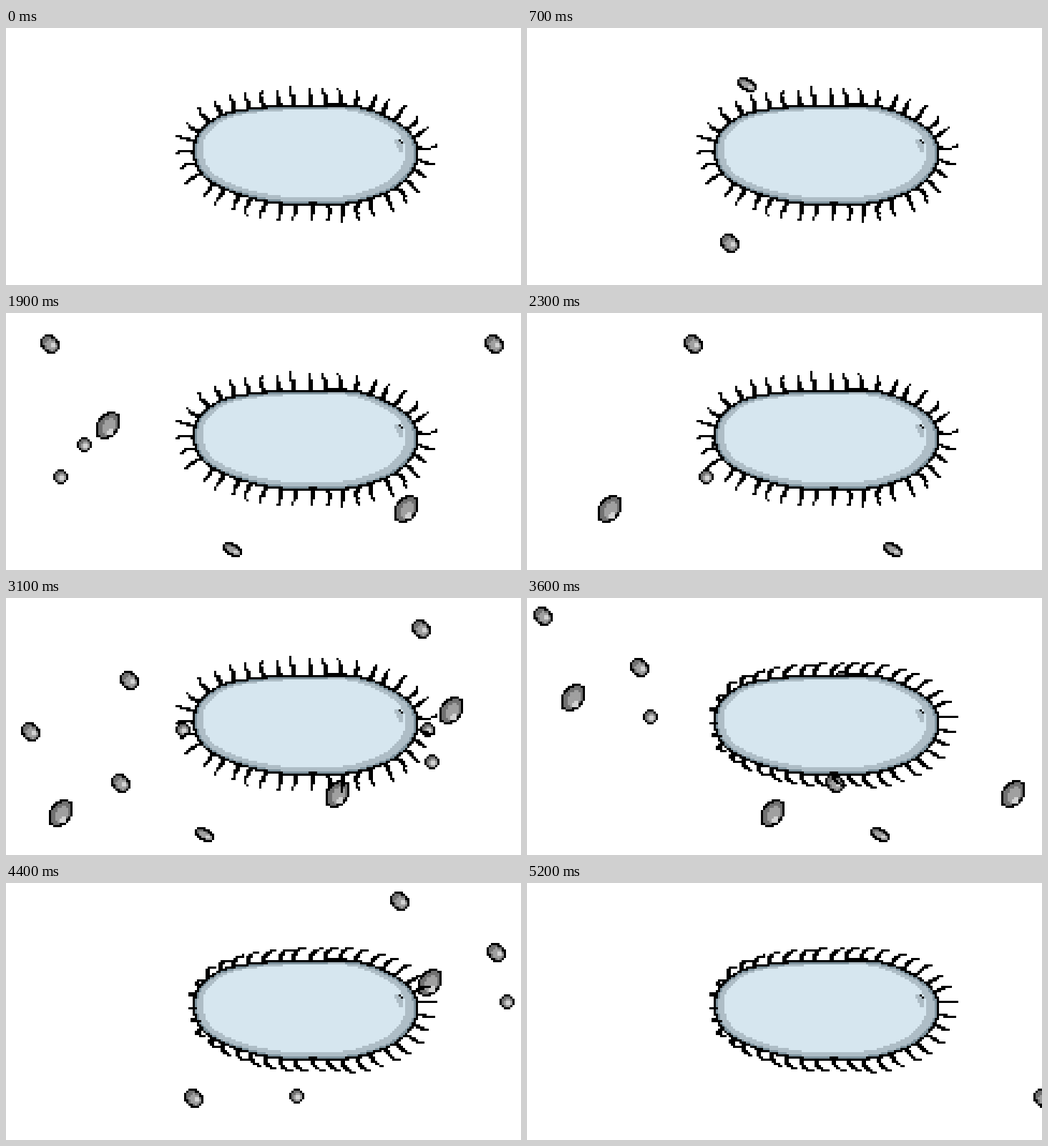
Write an HTML page with a canvas that moves like this. It is 720 by 360 pixels and loops after 5220 ms.

```html
<!DOCTYPE html>
<html>
<head>
<meta charset="utf-8">
<style>
  html, body { margin: 0; width: 100%; height: 100%; overflow: hidden; background: #fff; }
  canvas { display: block; width: 720px; height: 360px; image-rendering: pixelated; }
</style>
</head>
<body>
<canvas id="stage" width="240" height="120"></canvas>
<script>
const ctx = document.getElementById('stage').getContext('2d');
const CELL = 3, STEP = 100, LOOP = 5220, HAIRS = 39;

let seed = 11;
const random = () => (seed = seed * 16807 % 2147483647) / 2147483647;
const wobble = size => (random() * 2 - 1) * size;

// Hard-edged polygon fill on the coarse pixel grid.
function fill(points, color, ox = 0, oy = 0) {
  const p = points.map(([x, y]) => [(x + ox) / CELL, (y + oy) / CELL]);
  const ys = p.map(q => q[1]);
  ctx.fillStyle = color;
  for (let row = Math.floor(Math.min(...ys)); row <= Math.max(...ys); row++) {
    const y = row + .5, hits = [];
    p.forEach(([x1, y1], i) => {
      const [x2, y2] = p[(i + 1) % p.length];
      if ((y1 <= y) !== (y2 <= y)) hits.push(x1 + (y - y1) * (x2 - x1) / (y2 - y1));
    });
    hits.sort((a, b) => a - b);
    for (let i = 0; i + 1 < hits.length; i += 2) {
      const left = Math.round(hits[i]);
      ctx.fillRect(left, row, Math.round(hits[i + 1]) - left, 1);
    }
  }
}

// Closed Catmull-Rom curve through a few key points.
function smooth(keys, parts = 20) {
  const at = i => keys[(i + keys.length) % keys.length];
  return keys.flatMap((_, i) => Array.from({ length: parts }, (_, k) => {
    const t = k / parts;
    return [0, 1].map(axis => {
      const [a, b, c, d] = [-1, 0, 1, 2].map(n => at(i + n)[axis]);
      return b + t * (c - a + t * (2 * a - 5 * b + 4 * c - d + t * (3 * (b - c) + d - a))) / 2;
    });
  }));
}

const body = smooth([[300, 121], [365, 109], [430, 107], [490, 108], [540, 126], [572, 154], [575, 190],
  [548, 224], [490, 246], [430, 248], [370, 246], [300, 225], [266, 196], [264, 152]]);

const inset = (dx, dy, shiftX = 0, shiftY = 0) => body.map(([x, y]) =>
  [418 + shiftX + (x - 418) * (1 - dx / 158), 177 + shiftY + (y - 177) * (1 - dy / 70)]);
const layers = [
  [body, '#000'],
  [inset(4, 3.5), '#7f939e'],
  [inset(7, 6), '#aebdc6'],
  [inset(17, 10), '#d6e6ef', -2, -2]
].map(([shape, color, x, y]) => ({ shape, color, x, y }));

// Roots spaced evenly by weighted length, so the ends are denser than the long sides.
function growHairs() {
  const next = i => body[(i + 1) % body.length];
  const lengths = body.map(([x, y], i) => Math.hypot((next(i)[0] - x) * .75, next(i)[1] - y));
  const spacing = lengths.reduce((a, b) => a + b) / HAIRS;
  const hairs = [];
  let run = spacing;
  body.forEach(([x, y], i) => {
    run += lengths[i];
    if (run < spacing || hairs.length === HAIRS) return;
    run -= spacing;
    const dx = next(i)[0] - x, dy = next(i)[1] - y, size = Math.hypot(dx, dy);
    const nx = dy / size, ny = -dx / size, reach = 22 + wobble(2), bend = wobble(6);
    const vx = nx * reach + wobble(3), vy = ny * reach;
    hairs.push({
      root: [x, y],
      upright: { mid: [x + vx / 2 - ny * bend, y + vy / 2 + nx * bend], tip: [x + vx, y + vy] },
      swept: { mid: [x + vx * .6, y + vy * .6], tip: [x + vx * .6 + 18 - 9 * Math.max(nx, 0), y + vy * .7] }
    });
  });
  return hairs;
}
const hairs = growHairs();

// Pixel stroke along a quadratic curve, thicker near its root.
function stroke([x0, y0], [x1, y1], [x2, y2]) {
  ctx.fillStyle = '#000';
  for (let i = 0; i <= 30; i++) {
    const t = i / 30, u = 1 - t;
    const x = u * u * x0 + 2 * u * t * x1 + t * t * x2;
    const y = u * u * y0 + 2 * u * t * y1 + t * t * y2;
    ctx.fillRect(Math.floor(x / CELL), Math.floor(y / CELL), t < .6 ? 2 : 1, 1);
  }
}

const mix = (a, b, t) => a.map((v, i) => v + (b[i] - v) * t);

function drawCell(sweep) {
  for (const { shape, color, x, y } of layers) fill(shape, color, x, y);
  stroke([546, 157], [550, 160], [551, 167]);
  ctx.fillStyle = '#aebdc6';
  for (let i = 0; i < 3; i++) ctx.fillRect(181 + i, 52 + i, 2, 2 + i);
  for (const { root, upright, swept } of hairs)
    stroke(root, mix(upright.mid, swept.mid, Math.min(sweep, 1)), mix(upright.tip, swept.tip, sweep));
}

// Stones are tilted ovals with a dark upper left and a bright lower right.
const stones = {
  pebble: { a: 15, b: 12, tilt: 45, shine: [4, 2] },
  rock: { a: 21.5, b: 15.5, tilt: -52, shine: [4, 9] },
  seed: { a: 15, b: 8.5, tilt: 30, shine: [4, 3] },
  grain: { a: 10.5, b: 10.5, tilt: 0, shine: [2, 1] }
};

function oval(a, b, tilt) {
  const c = Math.cos(tilt * Math.PI / 180), s = Math.sin(tilt * Math.PI / 180);
  return Array.from({ length: 32 }, (_, i) => {
    const x = a * Math.cos(i * Math.PI / 16), y = b * Math.sin(i * Math.PI / 16);
    return [x * c - y * s, x * s + y * c];
  });
}

function drawStone(kind, x, y) {
  const { a, b, tilt, shine } = stones[kind];
  fill(oval(a, b, tilt), '#000', x, y);
  fill(oval(a - 3.5, b - 3.5, tilt), '#717171', x, y);
  fill(oval(a * .6, b * .55, tilt), '#a0a0a0', x + 1.5, y + 1.5);
  fill(oval(a * .3, b * .25, tilt), '#d2d2d2', x + shine[0], y + shine[1]);
}

// Each stream drifts right at its own rate, passing its listed places at one step.
const streams = [
  { at: 14, drift: 53.25, items: [['seed', 680, 79], ['pebble', 657, 301]] },
  { at: 14, drift: 66.6, items: [['pebble', 348, 43], ['rock', 225, 274]] },
  { at: 14, drift: 48.67, items: [['grain', 76, 184], ['seed', 73, 331]] },
  { at: 31, drift: 40, items: [['rock', 621, 157], ['grain', 589, 184]] },
  { at: 31, drift: 43.2, items: [['pebble', 579, 43], ['grain', 596, 229], ['rock', 462, 274], ['seed', 277, 331]] },
  { at: 31, drift: 53.9, items: [['pebble', 172, 115], ['pebble', 34, 187], ['grain', 247, 184],
    ['pebble', 160, 259], ['rock', 75, 301]] },
  { at: 36, drift: 66, items: [['pebble', 21, 25], ['pebble', 156, 97], ['rock', 63, 139], ['grain', 172, 166]] },
  { at: 44, drift: 57.4, items: [['pebble', 261, 301], ['grain', 406, 298]] }
];

const snap = v => (Math.floor(v / CELL) + .5) * CELL;

function draw(step) {
  ctx.fillStyle = '#fff';
  ctx.fillRect(0, 0, 240, 120);
  for (const { at, drift, items } of streams)
    for (const [kind, x, y] of items) drawStone(kind, snap(x + drift * (step - at)), snap(y));
  drawCell(step ? [1, 1.5, 1, 0][step % 4] : 0);
}

function tick() {
  draw(Math.floor(performance.now() % LOOP / STEP));
  requestAnimationFrame(tick);
}
tick();
</script>
</body>
</html>
```
